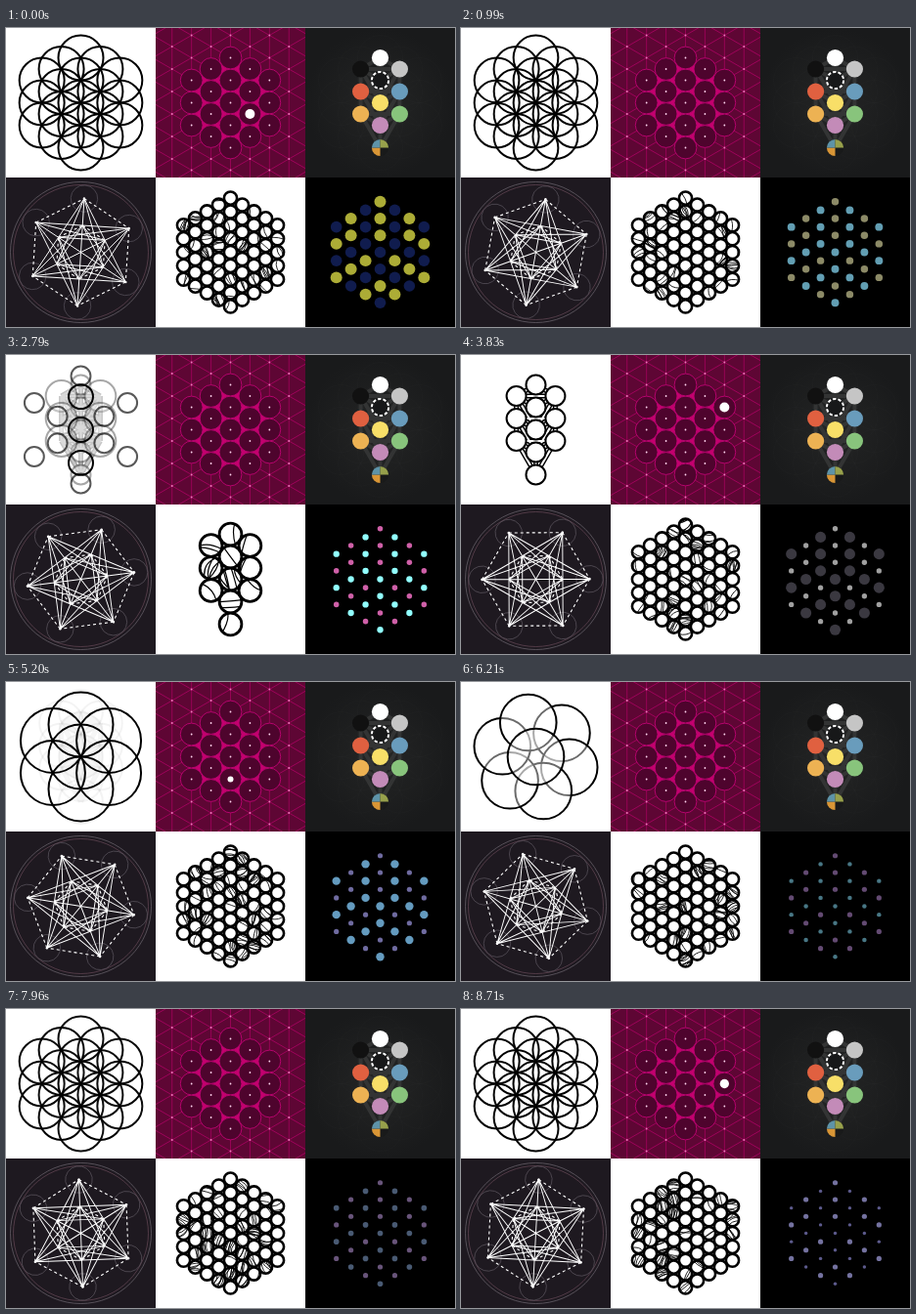
Animation, 459 px wide and 306 px high, one loop 8740 ms. Source, as an HTML page with a canvas:

```html
<!DOCTYPE html>
<html lang="en">
<head>
<meta charset="utf-8">
<title>Sacred geometry</title>
<style>
html, body { margin: 0; width: 100%; height: 100%; overflow: hidden; background: #fff; }
canvas { display: block; width: 459px; height: 306px; }
</style>
</head>
<body>
<canvas id="stage"></canvas>
<script>
const LOOP = 8740, SIZE = 153, TAU = Math.PI * 2;
const UNIT = 23, COLUMN = UNIT * Math.sqrt(3) / 2, WIDE = COLUMN * 2;
const canvas = document.getElementById('stage');
const dpr = window.devicePixelRatio || 1;
canvas.width = 459 * dpr;
canvas.height = 306 * dpr;
const ctx = canvas.getContext('2d');

const mix = (a, b, p) => a + (b - a) * p;
const mixPoint = (a, b, p) => [mix(a[0], b[0], p), mix(a[1], b[1], p)];
const clamp = v => Math.max(0, Math.min(1, v));
const ramp = (t, from, to) => clamp((t - from) / (to - from));
const ease = p => p * p * (3 - 2 * p);

// Hexagonal geometry; angles are counted in sixths of a turn from the top.
const polar = (sixth, d) => [d * Math.sin(sixth * TAU / 6), -d * Math.cos(sixth * TAU / 6)];
const SIXTHS = [0, 1, 2, 3, 4, 5];
function ring(k, step) {
  if (!k) return [[0, 0]];
  return SIXTHS.flatMap(i => Array.from({ length: k }, (_, j) =>
    mixPoint(polar(i, k * step), polar(i + 1, k * step), j / k)));
}
const lattice = (n, step) => Array.from({ length: n + 1 }, (_, k) => ring(k, step)).flat();

// Tree of life: five nodes on the middle pillar, then three pairs beside it.
const TREE = [
  ...[-2, -1, 0, 1, 2].map(row => [0, row * UNIT]),
  ...[-1.5, -.5, .5].flatMap(row => [[-COLUMN, row * UNIT], [COLUMN, row * UNIT]])
];
const PATHS = TREE.flatMap(a => TREE.filter(b => {
  const d = Math.hypot(a[0] - b[0], a[1] - b[1]);
  return d > 0 && a[1] <= b[1] && (d < UNIT + 1 || a[0] && d < WIDE + 1);
}).map(b => [a, b]));

function circle([x, y], r, stroke, width, fill) {
  if (r <= 0) return;
  ctx.beginPath();
  ctx.arc(x, y, r, 0, TAU);
  if (fill) { ctx.fillStyle = fill; ctx.fill(); }
  if (stroke) { ctx.strokeStyle = stroke; ctx.lineWidth = width; ctx.stroke(); }
}
const disc = (p, r, color) => circle(p, r, null, 0, color);
function lines(pairs, color, width) {
  ctx.beginPath();
  for (const [a, b] of pairs) { ctx.moveTo(...a); ctx.lineTo(...b); }
  ctx.strokeStyle = color;
  ctx.lineWidth = width;
  ctx.stroke();
}
function random(seed) {
  return () => {
    seed = (seed + 0x6D2B79F5) | 0;
    let v = Math.imul(seed ^ (seed >>> 15), 1 | seed);
    v = (v + Math.imul(v ^ (v >>> 7), 61 | v)) ^ v;
    return ((v ^ (v >>> 14)) >>> 0) / 4294967296;
  };
}
const black = alpha => `rgba(0,0,0,${alpha})`;
const white = alpha => `rgba(255,255,255,${alpha})`;

// Panel 1: one figure turning into the next
function drawTree(radius, alpha) {
  ctx.globalAlpha = alpha;
  lines(PATHS, '#000', 5);
  lines(PATHS, '#fff', 2.2);
  TREE.forEach(c => circle(c, radius(c), '#000', 2, '#fff'));
  ctx.globalAlpha = 1;
}
function flowerToFruit(p) {
  SIXTHS.forEach(i => circle(polar(i + .5, WIDE), UNIT, black(1 - p), 2));
  const step = mix(UNIT, 27.5, p);
  [[0, 0], ...SIXTHS.flatMap(i => [polar(i, step), polar(i, 2 * step)])]
    .forEach(c => circle(c, mix(UNIT, 13.75, p), '#000', 2));
}
function fruitToTree(p) {
  if (p > 0) drawTree(c => c[0] ? mix(19, 10, p) : 10, p);
  const fade = black(1 - p), shrunk = 13.75 * (1 - .8 * p);
  SIXTHS.forEach(i => {
    circle(polar(i, 55), shrunk, fade, 2);
    if (i % 3) circle(polar(i, 27.5), shrunk, fade, 2);
  });
  [-1, 0, 1].forEach(s => circle([0, s * mix(27.5, 46, p)], mix(13.75, 10, p), '#000', 2));
}
function treeToSeed(p) {
  if (p < 1) drawTree(() => mix(10, UNIT, p), 1 - p);
  const grown = clamp(p * 1.1);
  if (p > 0) [[0, 0], ...SIXTHS.map(i => polar(i, 33 * grown))]
    .forEach(c => circle(c, mix(10, 33, grown), black(grown), 2));
}
function seedToRosette(p) {
  const r = mix(33, UNIT, p);
  [1, 2, 3, 4, 5, 0].forEach(i =>
    circle(polar(i - .5 * p, mix(33, WIDE, p)), r, '#000', 2, white(p)));
  circle([0, 0], r, '#000', 2, white(p));
}
function rosetteToFlower(p) {
  const fill = white(1 - p);
  [1, 2, 3, 4, 5, 0].forEach(i => circle(polar(i - .5, WIDE), UNIT, '#000', 2, fill));
  circle([0, 0], UNIT, '#000', 2, fill);
  SIXTHS.forEach(i => [1, 2].forEach(k => circle(polar(i, k * UNIT), UNIT, black(p), 2)));
}
function morph(t) {
  const stage = (from, to) => ease(ramp(t, from, to));
  if (t < 1600) flowerToFruit(stage(950, 1500));
  else if (t < 3400) fruitToTree(stage(2400, 3390));
  else if (t < 5400) treeToSeed(stage(4550, 5300));
  else if (t < 7200) seedToRosette(stage(5900, 6600));
  else rosetteToFlower(stage(7350, 8050));
}

// Panel 2: nodes of the lattice that light up in turn, each with its peak time
const NODES = lattice(2, UNIT);
const PULSES = [[3, 0], [2, 1960], [9, 3830], [4, 5320], [18, 7070], [10, 8690]];
function grid(t) {
  for (let a = 0; a < 3; a++) {
    ctx.save();
    ctx.rotate(a * TAU / 6);
    const rows = [];
    for (let i = -6; i <= 6; i++) rows.push([[i * COLUMN, -120], [i * COLUMN, 120]]);
    lines(rows, '#a5035f', .8);
    ctx.restore();
  }
  ctx.beginPath();
  SIXTHS.forEach(i => ctx.lineTo(...polar(i, 2 * UNIT)));
  ctx.fillStyle = '#c4006e';
  ctx.fill();
  NODES.forEach(p => circle(p, 11.4, '#c00474', .9, '#4e042d'));
  lattice(5, UNIT).forEach((p, i) => disc(p, .9, i < NODES.length ? '#ffd4ee' : '#e882bb'));
  for (const [node, peak] of PULSES) disc(NODES[node], 5 * (1 - Math.abs(t - peak) / 300), '#fff');
}

// Panel 3: coloured tree, in the order of its nodes
const HUES = ['#fff', '#171819', '#f8df68', '#c38bb8', '#191a1a',
  '#111', '#c5c5c5', '#e06040', '#699cbc', '#edb253', '#88c47c'];
function colorTree() {
  const glow = ctx.createRadialGradient(0, 0, 0, 0, 0, 76);
  glow.addColorStop(0, '#242525');
  glow.addColorStop(1, '#191a1b');
  ctx.fillStyle = glow;
  ctx.fillRect(-SIZE / 2, -SIZE / 2, SIZE, SIZE);
  NODES.forEach(p => circle(p, UNIT, white(.012), 1));
  lines(PATHS, '#333434', 4);
  TREE.forEach((p, i) => disc(p, 8.6, HUES[i]));
  const dash = 8.6 * TAU / 10;
  ctx.setLineDash([dash * .62, dash * .38]);
  circle(TREE[1], 8.6, '#fff', 2);
  ctx.setLineDash([]);
  ['#d99636', '#5e93a8', '#97a04b'].forEach((color, i) => {
    ctx.beginPath();
    ctx.moveTo(...TREE[4]);
    ctx.arc(...TREE[4], 8.6, (i + 1) * TAU / 4, (i + 2) * TAU / 4);
    ctx.fillStyle = color;
    ctx.fill();
  });
}

// Panel 4: turning star
function star(t) {
  circle([0, 0], 72, '#655f68', .8);
  circle([0, 0], 69, '#684958', .7);
  ctx.rotate((3.6 + 59.6 * t / LOOP) * TAU / 360);
  const outer = SIXTHS.map(i => polar(i, 55)), inner = SIXTHS.map(i => polar(i, 27.5));
  outer.forEach(p => circle(p, 13.75, '#59535c', .7));
  const rays = SIXTHS.flatMap(i => [
    [outer[i], outer[(i + 2) % 6]],
    [outer[i], inner[(i + 2) % 6]],
    [outer[i], inner[(i + 4) % 6]],
    [inner[i], inner[(i + 2) % 6]],
    [outer[i], [0, 0]]
  ]);
  lines(rays, '#fff', .95);
  ctx.setLineDash([3, 3]);
  for (const hexagon of [outer, inner])
    lines(SIXTHS.map(i => [hexagon[i], hexagon[(i + 1) % 6]]), '#fff', 1.1);
  ctx.setLineDash([]);
  outer.forEach(p => disc(p, 1.3, '#fff'));
}

// Panel 5: rings with flickering hatching
function scribble([x, y], r, seed, blank) {
  const rnd = random(seed);
  if (rnd() < blank) return;
  const count = 1 + Math.floor(rnd() ** 2 * 9), angle = rnd() * TAU;
  const off = () => (rnd() * 2 - 1) * r;
  ctx.save();
  ctx.beginPath();
  ctx.arc(x, y, r, 0, TAU);
  ctx.clip();
  ctx.translate(x, y);
  ctx.rotate(angle);
  ctx.beginPath();
  for (let i = 0; i < count; i++) {
    const start = off();
    ctx.moveTo(-r, start);
    ctx.quadraticCurveTo(off() * .5, start + off() * .6, r, start + off() * .5);
  }
  ctx.strokeStyle = '#000';
  ctx.lineWidth = r > 8 ? 1.2 : .8;
  ctx.stroke();
  ctx.restore();
}
function hatchedRings(points, r, width, t, blank) {
  points.forEach((p, i) => {
    circle(p, r, '#000', width, '#fff');
    scribble(p, r, i * 7919 + Math.floor(t / 170 + i * .37) * 104729, blank);
  });
}
function rings(t) {
  const away = ramp(t, 1350, 1880) * (1 - ramp(t, 3250, 3650));
  const tree = ramp(t, 1350, 1650) * (1 - ramp(t, 3300, 3700));
  ctx.globalAlpha = 1 - away;
  if (away < 1) hatchedRings(lattice(4, 13.85), 6.6, 2.6, t, away > .5 ? 1 : .42);
  ctx.globalAlpha = tree;
  if (tree > 0) hatchedRings(TREE, 11.4, 2.8, t, .12);
  ctx.globalAlpha = 1;
}

// Panel 6: two interleaved sets of dots; time and the colour of each set
const TINTS = [
  [0, '#101c4e', '#acac36'],
  [1810, '#a0ffff', '#74708c'],
  [2790, '#91ffff', '#cf60a8'],
  [3830, '#3a3840', '#a0a0a0'],
  [5200, '#649bbf', '#6f6ba0'],
  [7100, '#315a55', '#5a2f4c'],
  [8710, '#5c5a8c', '#7472a0']
];
const channels = hex => [1, 3, 5].map(i => parseInt(hex.slice(i, i + 2), 16));
function blend(from, to, p) {
  const end = channels(to);
  return `rgb(${channels(from).map((v, i) => Math.round(mix(v, end[i], p)))})`;
}
function dots(t) {
  const next = Math.max(1, TINTS.findIndex(([time]) => time > t));
  const last = t >= TINTS[TINTS.length - 1][0] ? TINTS.length - 1 : next;
  const a = TINTS[last - 1], b = TINTS[last], p = ease(ramp(t, a[0], b[0]));
  const colors = [1, 2].map(i => blend(a[i], b[i], p));
  const radii = [
    (4 + 1.8 * Math.cos(TAU * (t - 4200) / 4300)) * (1 - .7 * ramp(t, 6500, 8710)),
    2.6 + 3.4 * Math.exp(-t / 900)
  ];
  lattice(3, 17.25).forEach((point, i) => disc(point, radii[i % 2], colors[i % 2]));
}

const PANELS = [['#fff', morph], ['#5e0634', grid], ['#191a1b', colorTree],
  ['#1e1920', star], ['#fff', rings], ['#000', dots]];
function draw(t) {
  ctx.setTransform(dpr, 0, 0, dpr, 0, 0);
  PANELS.forEach(([background, paint], i) => {
    ctx.save();
    ctx.translate(i % 3 * SIZE, Math.floor(i / 3) * SIZE);
    ctx.beginPath();
    ctx.rect(0, 0, SIZE, SIZE);
    ctx.clip();
    ctx.fillStyle = background;
    ctx.fillRect(0, 0, SIZE, SIZE);
    ctx.translate(SIZE / 2, SIZE / 2);
    paint(t);
    ctx.restore();
  });
}

const began = performance.now();
function tick() {
  draw((performance.now() - began) % LOOP);
  requestAnimationFrame(tick);
}
tick();
</script>
</body>
</html>
```
